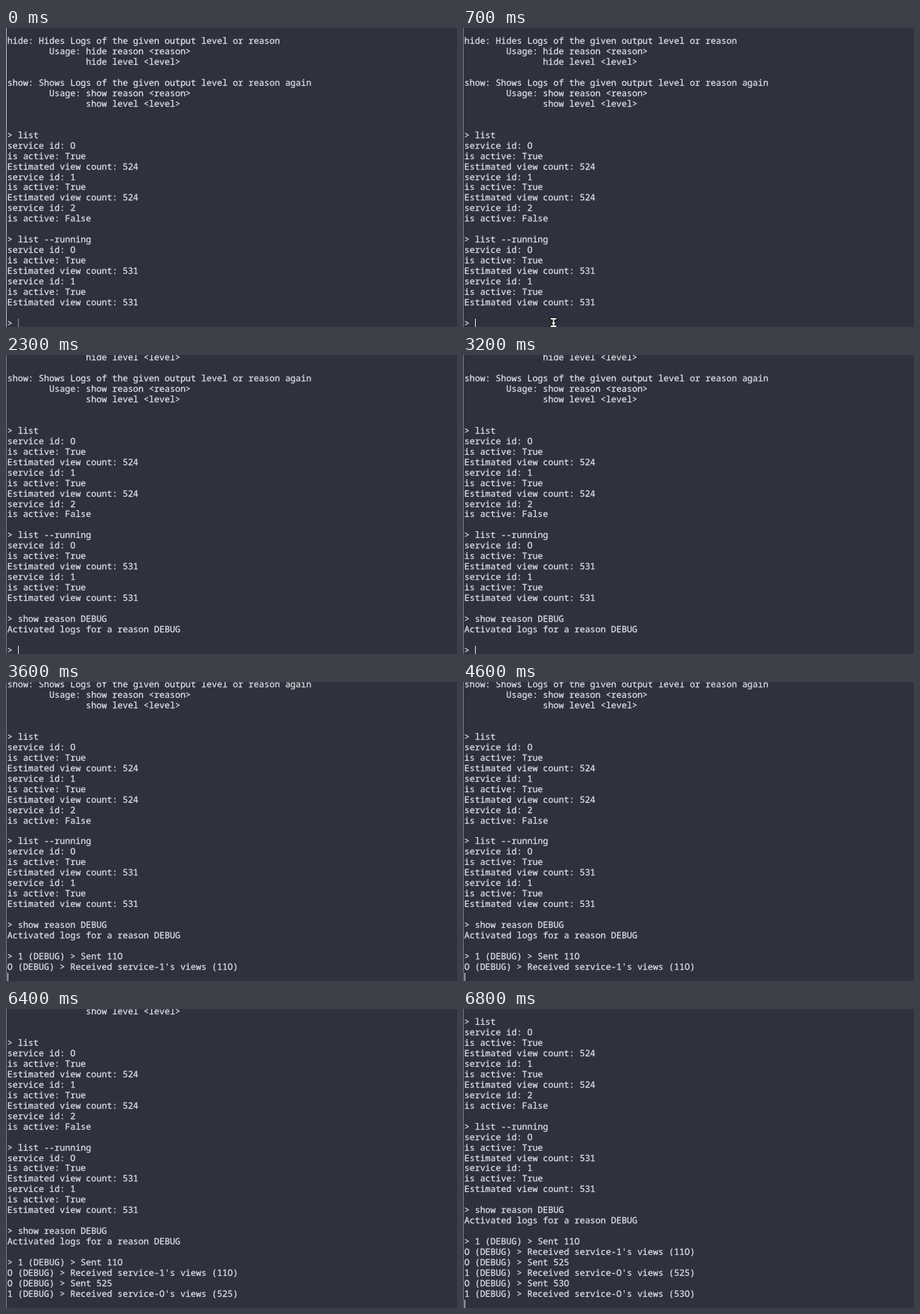
An HTML page with a canvas for the animation above (7.1 s loop, 600x399 px).

```html
<!DOCTYPE html>
<html lang="en">
<head>
<meta charset="utf-8">
<title>Service console</title>
<style>
  html, body { margin: 0; width: 100%; height: 100%; overflow: hidden; background: #2d323e; }
  canvas { display: block; }
</style>
</head>
<body>
<canvas id="stage" width="600" height="399"></canvas>
<script>
const ctx = document.getElementById('stage').getContext('2d');
const LOOP = 7100;
const COL = 6.98, ROW = 13.963, LEFT = 1.7, FIRST_BASELINE = 21;
const BOTTOM_ROW = 27;
const INK = '#e0e3e8';
const COMMAND = 'show reason DEBUG';

const service = (id, views) => [
  `service id: ${id}`,
  `is active: ${views ? 'True' : 'False'}`,
  ...(views ? [`Estimated view count: ${views}`] : [])
];
const usage = (name, text) => [
  `${name}: ${text}`,
  `        Usage: ${name} reason <reason>`,
  `               ${name} level <level>`
];
const transfer = (from, to, views) => [
  `${from} (DEBUG) > Sent ${views}`,
  `${to} (DEBUG) > Received service-${from}'s views (${views})`
];

const history = [
  ...usage('hide', 'Hides Logs of the given output level or reason'), '',
  ...usage('show', 'Shows Logs of the given output level or reason again'), '', '',
  '> list', ...service(0, 524), ...service(1, 524), ...service(2), '',
  '> list --running', ...service(0, 531), ...service(1, 531), ''
];

// Each batch of output arrives at once and scrolls the console.
const batches = [
  { at: 2100, lines: ['> ' + COMMAND, 'Activated logs for a reason DEBUG', ''] },
  { at: 3400, lines: transfer(1, 0, 110).map((s, i) => i ? s : '> ' + s) },
  { at: 4700, lines: transfer(0, 1, 525) },
  { at: 6700, lines: transfer(0, 1, 530) }
];

function typedCount(t) {
  if (t < 900) return 0;
  if (t < 1600) return Math.min(12, 3 * (Math.floor((t - 900) / 100) + 1));
  return Math.min(COMMAND.length, 13 + Math.floor((t - 1600) / 100));
}

function consoleAt(t) {
  const done = batches.filter(b => t >= b.at);
  const lines = [...history, ...done.flatMap(b => b.lines)];
  const last = done.length ? done[done.length - 1].at : 0;
  lines.push(last === 0 ? '> ' + COMMAND.slice(0, typedCount(t))
    : last === batches[0].at ? '> ' : '');
  return { lines, last };
}

function caretVisible(t, last) {
  return last ? Math.floor((t - last) / 500) % 2 === 0 : t >= 500;
}

function drawCaret(x, visible, dotted) {
  ctx.fillStyle = INK;
  if (dotted) {
    for (let y = 388; y < 399; y += 2) ctx.fillRect(x, y, 1, 1);
  } else if (visible) {
    ctx.fillRect(x, 388, 1, 11);
  }
}

function drawPointer(x, y) {
  const beam = new Path2D('M-3 -5H-1L0 -4L1 -5H3M0 -4V4M-3 5H-1L0 4L1 5H3M-1 1H1');
  ctx.save();
  ctx.translate(x + 0.5, y);
  ctx.lineCap = 'square';
  for (const [color, width] of [['#0c0e12', 4], ['#f4f4f4', 1.8]]) {
    ctx.strokeStyle = color;
    ctx.lineWidth = width;
    ctx.stroke(beam);
  }
  ctx.restore();
}

function drawEdge(bright) {
  ctx.fillStyle = bright ? '#b4b7bc' : '#777b80';
  ctx.fillRect(0, 0, 1, 399);
}

function drawLine(text, y) {
  // The console face is sturdy and has an open zero, without a slash.
  const glyphs = text.replace(/0/g, 'O');
  ctx.fillText(glyphs, LEFT, y);
  ctx.strokeText(glyphs, LEFT, y);
}

function draw(t) {
  const { lines, last } = consoleAt(t);
  const scroll = lines.length - 1 - BOTTOM_ROW;

  ctx.fillStyle = '#2d323e';
  ctx.fillRect(0, 0, 600, 399);
  drawEdge(t < 100);

  ctx.font = '11.635px "Noto Sans Mono", "DejaVu Sans Mono", monospace';
  ctx.textRendering = 'geometricPrecision';
  ctx.textBaseline = 'alphabetic';
  ctx.fillStyle = ctx.strokeStyle = INK;
  ctx.lineWidth = 0.25;
  ctx.lineJoin = 'round';
  lines.forEach((line, i) => {
    const y = Math.round(FIRST_BASELINE + (i - scroll) * ROW);
    if (y > 0) drawLine(line, y);
  });

  const caretX = Math.round(2 + lines[lines.length - 1].length * COL);
  drawCaret(caretX, caretVisible(t, last), t < 100);
  if (t >= 500 && t < 900) {
    const rise = Math.min(1, (t - 500) / 100);
    drawPointer(120, 393 + 10 * (1 - rise));
  }
}

function frame() {
  draw(performance.now() % LOOP);
  requestAnimationFrame(frame);
}
frame();
</script>
</body>
</html>
```
